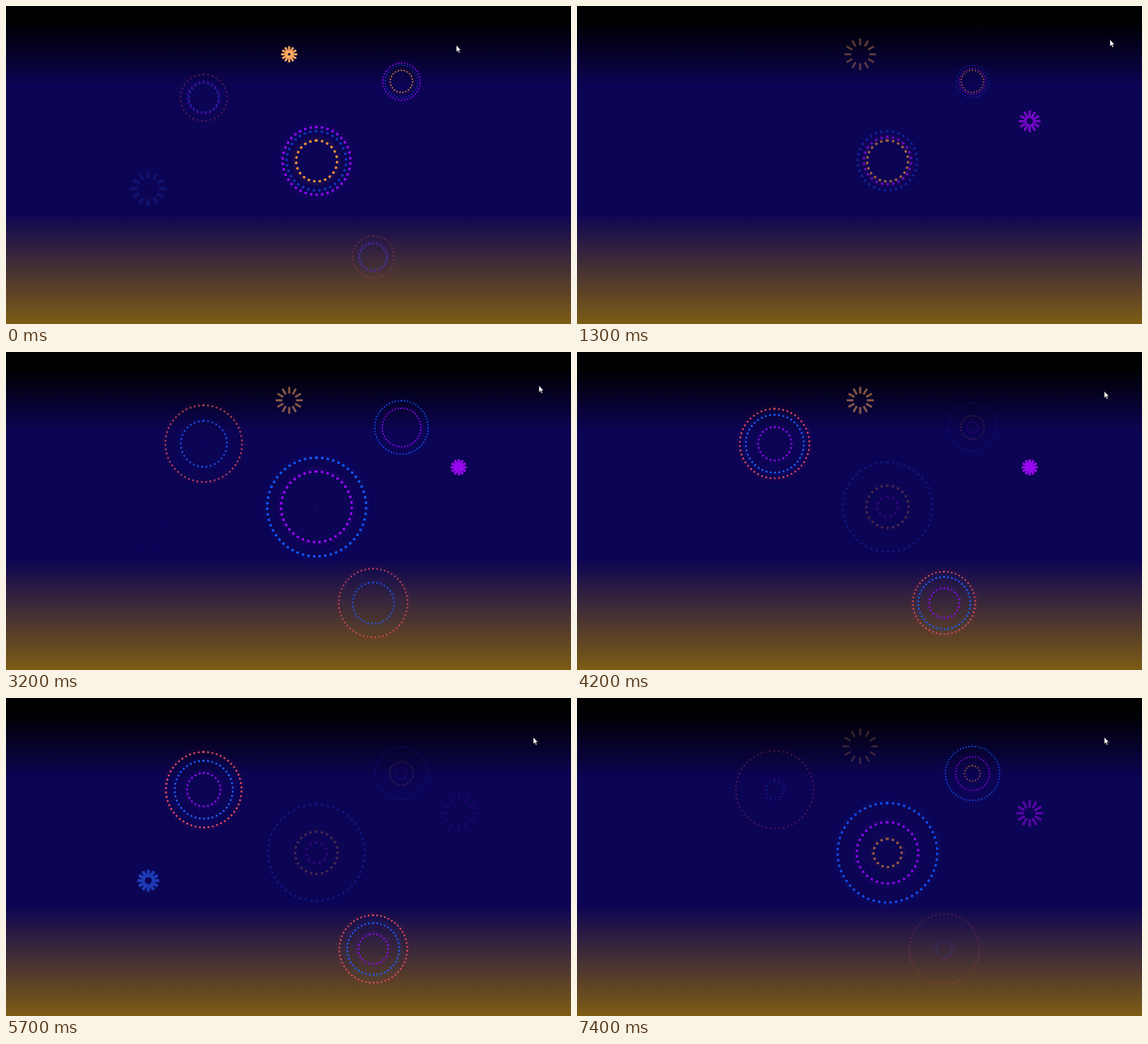
An HTML page for the animation above (7.5 s loop, 800 by 451 pixels).

```html
<!DOCTYPE html>
<html lang="en">
<head>
<meta charset="utf-8">
<title>Fireworks</title>
<style>
html, body { margin: 0; width: 100%; height: 100%; overflow: hidden; background: #000; }
#sky {
  position: relative; width: 800px; height: 451px; overflow: hidden;
  background: linear-gradient(#000 5%, #0c0454 25%, #0c0454 65%, #7d5c14 100%);
}
svg { position: absolute; left: 0; top: 0; }
.shell { position: absolute; width: 0; height: 0; }
.ring {
  position: absolute; box-sizing: border-box; border: 4px dotted; border-radius: 50%;
  transform: translate(-50%, -50%);
}
</style>
</head>
<body>
<div id="sky">
  <svg id="bursts" width="800" height="451"></svg>
  <svg id="pointer" width="10" height="14" viewBox="0 0 10 14">
    <path d="M.6 .6V10.2L2.7 8.3L4.3 11.8L5.8 11.1L4.3 7.8H7.2Z" fill="#fff" stroke="#111" stroke-width=".6"/>
  </svg>
</div>
<script>
const LOOP = 7500, STEP = 100, RAYS = 12;
const sky = document.getElementById('sky');
const burstLayer = document.getElementById('bursts');
const pointer = document.getElementById('pointer');

const clamp = v => Math.max(0, Math.min(1, v));
const easeOut = (p, power) => 1 - (1 - p) ** power;
const cycle = (t, period, start) => ((t - start + 2 * period) % period) / period;

function addRing(parent, color) {
  const el = document.createElement('div');
  el.className = 'ring';
  el.style.borderColor = color;
  el.style.boxShadow = `0 0 10px ${color}30`;
  parent.append(el);
  return el;
}

// A shell pulses at its own period; its two halos share one slower rhythm.
function addShell(x, y, scale, type) {
  const el = document.createElement('div');
  el.className = 'shell';
  el.style.cssText = `left: ${x}px; top: ${y}px; transform: scale(${scale})`;
  sky.insertBefore(el, burstLayer);
  const [outer, core, inner] = type.colors.map(c => addRing(el, c));
  return { el, outer, core, inner, ...type };
}

const cool = { period: 750, start: 400, size: 50.5, colors: ['#1458ff', '#9a08ff', '#ff9c38'] };
const warm = { period: 1500, start: 1300, size: 53, colors: ['#e04c5c', '#1c5cff', '#8c0cf0'] };
const shells = [
  addShell(439.5, 219.5, 1, cool),
  addShell(559.5, 107, .54, cool),
  addShell(279.5, 130, .775, warm),
  addShell(519.5, 355.5, .695, warm)
];

function setRing(el, radius, opacity) {
  el.style.width = el.style.height = 2 * radius + 4 + 'px';
  el.style.opacity = opacity;
}

function drawShell(s, t) {
  const core = easeOut(cycle(t, s.period, s.start), 5);
  const outer = easeOut(cycle(t, 1300, 1035), 4);
  const inner = easeOut(cycle(t, 1300, 590), 4);
  s.el.style.opacity = core ** 1.2;
  setRing(s.core, s.size * core, 1);
  setRing(s.outer, 71 * outer, outer);
  setRing(s.inner, 30.5 * inner, inner);
}

function addSvg(parent, tag, attrs) {
  const el = document.createElementNS('http://www.w3.org/2000/svg', tag);
  for (const name in attrs) el.setAttribute(name, attrs[name]);
  parent.append(el);
  return el;
}

function addBurst(x, y, color, length, width, start) {
  const group = addSvg(burstLayer, 'g', {
    transform: `translate(${x} ${y})`, stroke: color, 'stroke-width': width
  });
  const rays = Array.from({ length: RAYS }, (_, i) =>
    addSvg(group, 'line', { transform: `rotate(${i * 360 / RAYS})` }));
  return { group, rays, length, start };
}

const bursts = [
  addBurst(401, 68.5, '#ffa860', 9.5, 3, 760),
  addBurst(641, 163.5, '#9a08f0', 11, 3.4, 960),
  addBurst(201.5, 259, '#2450d8', 10.5, 4.5, 360)
];

function drawBurst({ group, rays, length, start }, t) {
  const p = cycle(t, 1000, start);
  const r = 30.5 * easeOut(p, 1.7);
  const fadeIn = clamp((p - .06) * 8), fadeOut = clamp(((1 - p) / .76) ** 2.2);
  group.setAttribute('opacity', fadeIn * fadeOut);
  for (const ray of rays) {
    ray.setAttribute('x1', Math.max(0, r - length));
    ray.setAttribute('x2', r);
  }
}

function movePointer(t) {
  const out = clamp((t - 100) / 400), back = clamp((t - 3400) / 400);
  const x = 637 + 117 * out - 8 * back;
  const y = 55 - 8 * out + 8 * back;
  pointer.style.transform = `translate(${x}px, ${y}px)`;
}

function render(t) {
  for (const s of shells) drawShell(s, t);
  for (const b of bursts) drawBurst(b, t);
  movePointer(t);
}

const begin = performance.now();
function tick() {
  const t = (performance.now() - begin) % LOOP;
  render(Math.floor(t / STEP) * STEP);
  requestAnimationFrame(tick);
}
tick();
</script>
</body>
</html>
```
